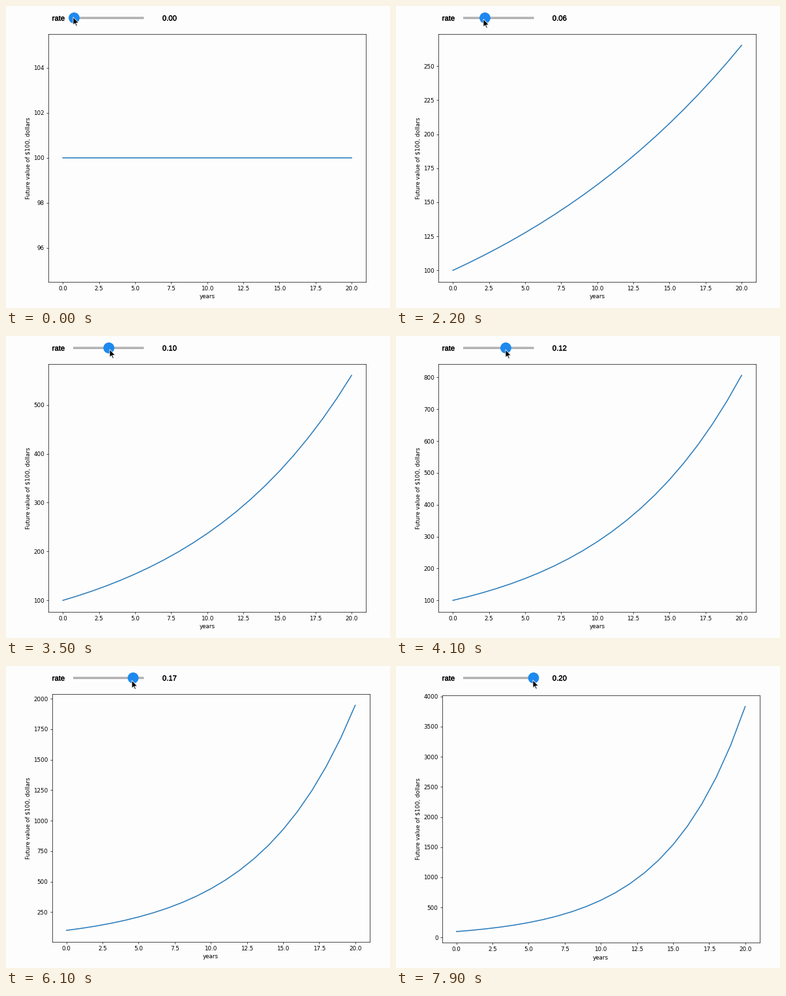
A matplotlib script that plays this animation: 589x463 px, repeating every 8 s.

```python
import numpy as np
import matplotlib.pyplot as plt
from matplotlib.animation import FuncAnimation
from matplotlib.patches import Circle, Polygon
from matplotlib.patheffects import withStroke

W, H, DPI = 589, 463, 64
FRAMES, INTERVAL = 80, 100
PT = 72 / DPI            # points per pixel
S = 0.873                # page zoom
BG = "#fefdfe"

# Plot box in pixels, top-left origin
LEFT, TOP, BOX_W, BOX_H = 65.1, 43.05, 487.1, 379.5
DIGIT_W, LABEL_HALF = 5.55, 3.7

# Slider geometry and pointer path
X0, STEP, BAR_Y = 104.5, 5.325, 18.3
LAG = 230                # the chart redraws a little after the slider
KEY_T = [100, 1200, 2200, 3500, 4900, 6100, 7600, 7900]
KEY_X = [103, 119, 134, 159, 180, 193, 209.5, 210]
KEY_Y = [17, 18.7, 20, 20.5, 21.5, 22, 21.5, 21.5]

plt.rcParams.update({
    "font.family": "DejaVu Sans",
    "font.size": 10 * S * PT,
    "axes.linewidth": 0.8 * S * PT,
    "axes.labelpad": 4 * S * PT,
    "axes.facecolor": BG,
    "lines.linewidth": 1.8 * S * PT,
})
for axis in ("xtick", "ytick"):
    plt.rcParams[axis + ".major.size"] = 3.5 * S * PT
    plt.rcParams[axis + ".major.pad"] = 3.5 * S * PT
    plt.rcParams[axis + ".major.width"] = 0.8 * S * PT

fig = plt.figure(figsize=(W / DPI, H / DPI), dpi=DPI, facecolor=BG)

# Chart
ax = fig.add_axes([0.1, 0.1, 0.8, 0.8])
years = np.arange(21)
curve, = ax.plot(years, np.full(21, 100.0), color="#2a7cba")
curve.set_snap(False)
ax.set_xlabel("years")
ax.set_ylabel("Future value of $100, dollars")

# Slider row, drawn in pixel coordinates
ui = fig.add_axes([0, 0, 1, 1], zorder=5)
ui.set(xlim=(0, W), ylim=(H, 0))
ui.axis("off")


def label(x, text):
    bolder = withStroke(linewidth=0.3 * PT, foreground="black")
    return ui.text(x, 22.4, text, family="Liberation Sans", size=13 * S * PT,
                   color="black", va="baseline", path_effects=[bolder])


label(70.7, "rate")
readout = label(239.8, "0.00")
ui.plot([103, 211.5], [BAR_Y, BAR_Y], color="#b3b1b3", lw=4 * S * PT,
        solid_capstyle="butt", snap=False)
thumb = ui.add_patch(Circle((X0, BAR_Y), 8.4, fc="#1d89ef", lw=0, zorder=3))
ARROW = 0.87 * np.array([(0, 0), (0, 14), (3.2, 11), (5.3, 16), (7.3, 15.2),
                         (5.2, 10.4), (9.7, 10.2)])
pointer = ui.add_patch(Polygon(ARROW, fc="black", ec="white", lw=0.8 * PT,
                               zorder=4))


def pointer_at(t):
    return np.interp(t, KEY_T, KEY_X), np.interp(t, KEY_T, KEY_Y)


def rate_at(t):
    steps = round((pointer_at(t)[0] - X0) / STEP)
    return min(max(steps, 0), 20) / 100


def place_axes():
    """Shift the plot box to make room for wide or overhanging tick labels."""
    lo, hi = ax.get_ylim()
    top_tick = max(v for v in ax.get_yticks() if v <= hi)
    gap = (hi - top_tick) / (hi - lo) * BOX_H
    x = LEFT + (DIGIT_W if top_tick >= 1000 else 0)
    y = TOP + max(0, LABEL_HALF - gap)
    ax.set_position([x / W, 1 - (y + BOX_H) / H, BOX_W / W, BOX_H / H])


def update(i):
    t = i * INTERVAL
    rate = rate_at(t)
    readout.set_text(f"{rate:.2f}")
    thumb.center = (X0 + rate * 100 * STEP, BAR_Y)
    pointer.set_xy(ARROW + pointer_at(t))

    curve.set_ydata(100 * (1 + rate_at(t - LAG)) ** years)
    ax.relim()
    ax.autoscale_view()
    place_axes()
    return curve, readout, thumb, pointer


anim = FuncAnimation(fig, update, frames=FRAMES, interval=INTERVAL,
                     repeat=True, repeat_delay=0, blit=False)
plt.show()
```
